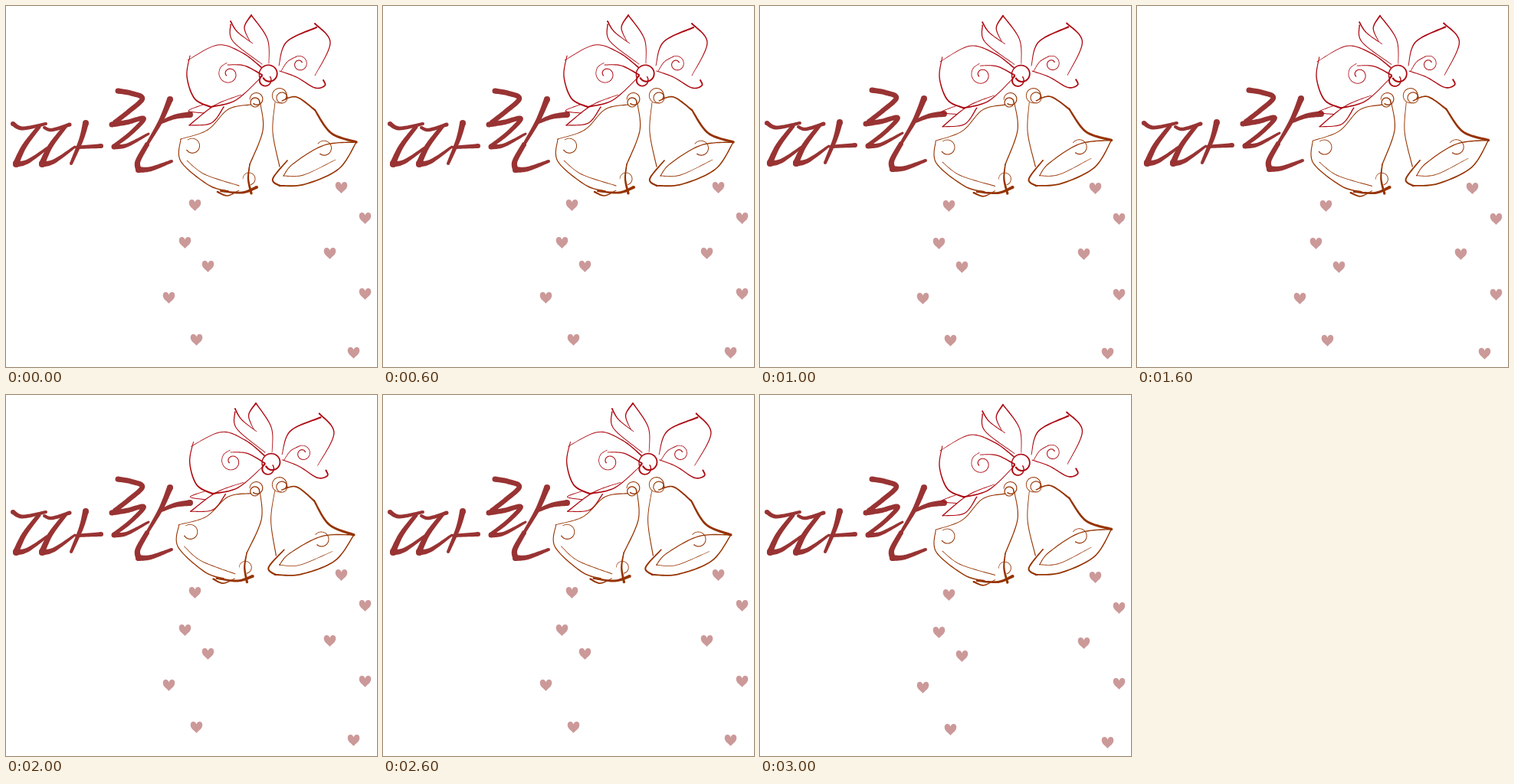
An HTML page with a canvas that plays this animation: 484x472 px, repeating every 4 s.

```html
<!DOCTYPE html>
<html lang="ko">
<head>
<meta charset="utf-8">
<title>따란</title>
<style>
html, body { margin: 0; width: 100%; height: 100%; overflow: hidden; background: #fff; }
canvas { display: block; }
</style>
</head>
<body>
<canvas id="stage" width="484" height="472" role="img" aria-label="따란"></canvas>
<script>
const ctx = document.getElementById('stage').getContext('2d');
const STEP = 1000;
const SWING = [0, -0.5, 1, -0.5];

const mix = (a, b, t) => a + (b - a) * t;

function spline(a, b, c, d, t) {
  return b + 0.5 * t * (c - a + t * (2 * a - 5 * b + 4 * c - d + t * (3 * (b - c) + d - a)));
}

// Smooth curve through the points, its width running from w0 to w1
function brush(w0, w1, ...pts) {
  const last = pts.length - 1, total = last * 12;
  const at = i => pts[Math.max(0, Math.min(last, i))];
  const point = k => {
    const i = Math.min(last - 1, Math.floor(k / 12)), t = k / 12 - i;
    return [0, 1].map(j => spline(at(i - 1)[j], at(i)[j], at(i + 1)[j], at(i + 2)[j], t));
  };
  const left = [], right = [];
  for (let k = 0; k <= total; k++) {
    const [x, y] = point(k), p = point(Math.max(0, k - 1)), q = point(Math.min(total, k + 1));
    const dx = q[0] - p[0], dy = q[1] - p[1];
    const r = mix(w0, w1, k / total) / 2 / (Math.hypot(dx, dy) || 1);
    left.push([x - dy * r, y + dx * r]);
    right.unshift([x + dy * r, y - dx * r]);
  }
  ctx.beginPath();
  left.concat(right).forEach(([x, y]) => ctx.lineTo(x, y));
  ctx.fill();
  dot(pts[0], w0 / 2);
  dot(pts[last], w1 / 2);
}

function dot([x, y], r) {
  ctx.beginPath();
  ctx.arc(x, y, r, 0, Math.PI * 2);
  ctx.fill();
}

// Spiral from radius r0 to r1, angles in turns
function curl(w, x, y, r0, r1, from, turns) {
  const pts = Array.from({ length: 13 }, (_, i) => {
    const a = (from + turns * i / 12) * Math.PI * 2, r = mix(r0, r1, i / 12);
    return [x + r * Math.cos(a), y + r * Math.sin(a)];
  });
  brush(w * 0.6, w, ...pts);
}

function part(color, draw, dx, dy, turn = 0, px = 0, py = 0) {
  ctx.save();
  ctx.fillStyle = color;
  ctx.translate(px + dx, py + dy);
  ctx.rotate(turn);
  ctx.translate(-px, -py);
  draw();
  ctx.restore();
}

function letters() {
  brush(6, 4, [9, 154], [22, 160], [52, 154]);
  brush(4, 5, [50, 159], [60, 162], [83, 155]);
  for (const x of [0, 34]) {
    brush(5, 8, [x + 43, 158], [x + 24, 183], [x + 13, 206]);
    brush(8, 3, [x + 13, 207], [x + 29, 203], [x + 56, 184]);
  }
  brush(8, 4, [104, 153], [98, 175], [85, 206]);
  brush(4, 6, [92, 185], [124, 183]);
  brush(7, 6, [146, 111], [163, 114], [178, 121], [160, 138], [142, 152]);
  brush(7, 5, [138, 155], [158, 152], [180, 147], [163, 166], [141, 183]);
  brush(7, 3, [141, 184], [158, 182], [186, 167]);
  brush(8, 4, [214, 122], [202, 150], [184, 181]);
  brush(4, 8, [200, 153], [220, 145], [240, 142]);
  brush(6, 8, [184, 181], [172, 203], [173, 214]);
  brush(8, 4, [173, 214], [189, 213], [216, 203]);
}

function bow() {
  // left loop and curl
  brush(1.6, 0.7, [333, 80], [308, 61], [276, 51], [237, 71]);
  brush(1, 2.2, [240, 65], [236, 92], [246, 121], [267, 132]);
  brush(2, 0.7, [267, 132], [300, 123], [334, 92]);
  brush(1.8, 0.8, [334, 90], [311, 78], [289, 77]);
  curl(1.2, 291, 89, 15, 4, 0.72, -1.3);
  // upper tails
  brush(1.8, 0.7, [293, 20], [302, 34], [322, 49]);
  brush(1.4, 0.8, [293, 24], [296, 46], [334, 76]);
  brush(2, 0.7, [320, 12], [311, 28], [318, 46]);
  brush(1.6, 0.7, [320, 12], [341, 43], [343, 75]);
  // right loop and curl
  brush(0.8, 2.2, [356, 78], [366, 47], [405, 28]);
  brush(2, 0.7, [403, 23], [423, 48], [403, 91]);
  brush(1, 2, [357, 85], [379, 93], [403, 107], [416, 104], [414, 97]);
  brush(0.7, 1, [359, 85], [367, 73], [379, 66]);
  curl(1.2, 383, 76, 11, 4, 0.7, 1.2);
  // knot
  curl(2.2, 343, 89, 13, 9, 0.45, 0.95);
  curl(2.2, 338, 97, 8, 7, 0.9, 0.75);
  // lower tail
  brush(0.7, 1.5, [307, 116], [272, 130], [239, 156]);
  brush(0.8, 1, [257, 129], [238, 137], [258, 140]);
  brush(1, 1.4, [240, 156], [268, 153], [284, 132]);
}

function leftBell() {
  curl(1.4, 327, 122, 9, 7, 0.5, 0.85);
  curl(1.5, 325, 126, 6, 6, 0, 1);
  brush(1.2, 0.8, [319, 129], [290, 135], [263, 162], [228, 174]);
  brush(1, 1.6, [228, 174], [228, 203], [264, 234], [290, 242]);
  brush(2, 4, [280, 242], [308, 244], [327, 237]);
  brush(1, 1.4, [332, 128], [335, 163], [318, 207]);
  brush(1.4, 3.2, [318, 207], [316, 226], [320, 245]);
  brush(0.7, 1, [236, 202], [259, 220], [304, 235]);
  curl(1.2, 243, 183, 10, 9, 0.65, 0.75);
  brush(2.4, 0.8, [276, 243], [289, 248], [304, 241]);
  curl(1, 317, 226, 8, 8, 0.5, 0.7);
}

function rightBell() {
  curl(1.2, 357, 117, 10, 9, 0.2, 0.9);
  curl(1.3, 360, 120, 7, 7, 0, 1);
  brush(0.8, 1.2, [351, 126], [348, 165], [357, 210]);
  brush(1.2, 2.2, [360, 124], [379, 119], [403, 136]);
  brush(2.2, 3.4, [403, 136], [424, 166], [457, 178]);
  brush(1.4, 2, [457, 178], [434, 213], [390, 233], [357, 235]);
  brush(2.4, 1.6, [357, 235], [348, 226], [367, 202]);
  brush(1.4, 1, [457, 178], [415, 182], [375, 206], [362, 222]);
  brush(1, 0.6, [362, 222], [388, 221], [430, 201]);
  curl(1.2, 415, 186, 10, 9, 0.6, 0.75);
}

const HEARTS = [[246, 260], [233, 309], [263, 340], [212, 381], [248, 436],
  [437, 237], [468, 277], [422, 323], [468, 376], [453, 453]];

function hearts() {
  for (const [x, y] of HEARTS) {
    ctx.beginPath();
    for (const s of [-7.8, 7.8]) {
      ctx.moveTo(x + 0.5, y + 8);
      ctx.bezierCurveTo(x + 0.5 + s * 0.4, y + 4.5, x + 0.5 + s, y + 2, x + 0.5 + s, y - 2.5);
      ctx.bezierCurveTo(x + 0.5 + s, y - 8, x + 0.5 + s * 0.2, y - 8.5, x + 0.5, y - 3.5);
    }
    ctx.fill();
  }
}

function draw(swing) {
  ctx.fillStyle = '#fff';
  ctx.fillRect(0, 0, 484, 472);
  part('#993333', letters, 0, swing ? -1 : 0);
  part('#ad0a12', bow, 4 * swing, -swing, 0.03 * swing, 330, 80);
  part('#963300', leftBell, 0, 0, 0.045 * swing, 327, 120);
  part('#963300', rightBell, 0, 0, 0.05 * swing, 357, 117);
  part('#cc9999', hearts, 0, -2 * swing);
}

const start = performance.now();
function tick() {
  const t = Math.max(0, performance.now() - start);
  draw(SWING[Math.floor(t / STEP) % SWING.length]);
  requestAnimationFrame(tick);
}
tick();
</script>
</body>
</html>
```
